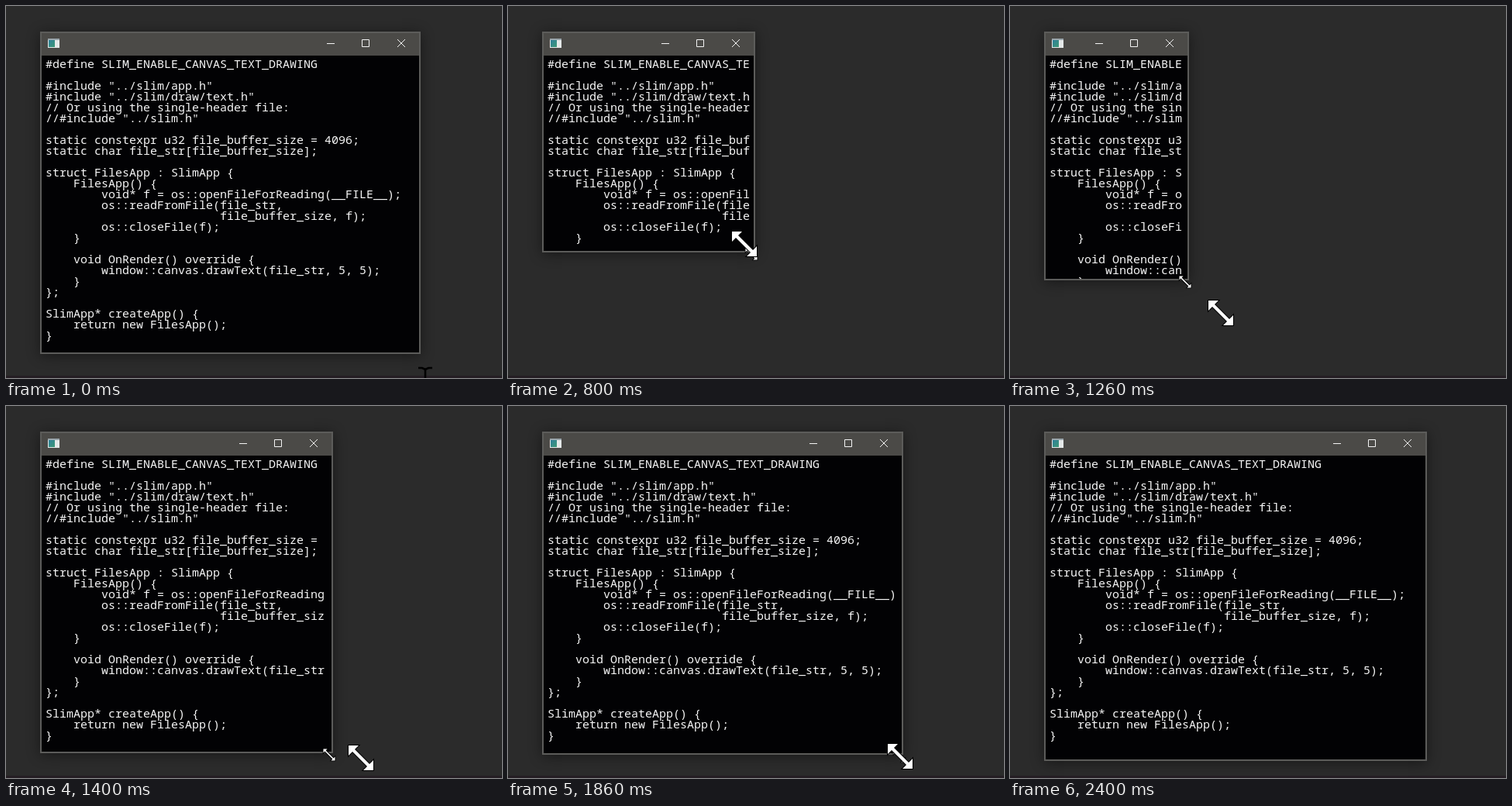
Write an HTML page with a canvas that moves like this. It is 640 px wide and 480 px high and loops after 2.6 s.

```html
<!DOCTYPE html>
<html lang="en">
<head>
<meta charset="utf-8">
<title>Window resize</title>
<style>
  html, body { margin: 0; width: 100%; height: 100%; overflow: hidden; background: #2b2b2b; }
  canvas { display: block; }
</style>
</head>
<body>
<canvas id="stage" width="640" height="480"></canvas>
<script>
const ctx = document.getElementById('stage').getContext('2d');
const LOOP = 2600;
const LEFT = 44, TOP = 33, BAR = 64, MIN_RIGHT = 167;
const CELL = 9, LINE = 14;

const code = `#define SLIM_ENABLE_CANVAS_TEXT_DRAWING

#include "../slim/app.h"
#include "../slim/draw/text.h"
// Or using the single-header file:
//#include "../slim.h"

static constexpr u32 file_buffer_size = 4096;
static char file_str[file_buffer_size];

struct FilesApp : SlimApp {
    FilesApp() {
        void* f = os::openFileForReading(__FILE__);
        os::readFromFile(file_str,
                         file_buffer_size, f);
        os::closeFile(f);
    }

    void OnRender() override {
        window::canvas.drawText(file_str, 5, 5);
    }
};

SlimApp* createApp() {
    return new FilesApp();
}`.split('\n');

// Pointer path during the drag: step, x, y
const drag = [
  [8, 531, 453], [8.5, 522, 470], [9, 490, 487], [10, 417, 472], [11, 338, 366],
  [11.5, 314, 320], [12, 305, 307], [13, 276, 262], [14, 226, 196], [15, 168, 146],
  [16, 140, 160], [16.5, 142, 195], [17, 148, 230], [18, 188, 312], [19, 272, 396],
  [20, 374, 442], [20.5, 417, 450], [21, 458, 454], [22, 530, 448], [23, 580, 432],
  [24, 602, 414], [25, 606, 400], [26, 580, 408], [27, 520, 442], [27.5, 505, 452],
  [28, 506, 452], [30, 528, 464], [31.5, 540, 468], [33.5, 533, 460], [34, 534, 461]
];

function slope(i, axis) {
  const a = drag[Math.max(i - 1, 0)], b = drag[Math.min(i + 1, drag.length - 1)];
  return (b[axis] - a[axis]) / (b[0] - a[0]);
}

// Smooth curve through the drag points
function pointer(s) {
  const last = drag.length - 1;
  s = Math.min(Math.max(s, drag[0][0]), drag[last][0]);
  let i = 0;
  while (i < last - 1 && drag[i + 1][0] <= s) i++;
  const a = drag[i], b = drag[i + 1], span = b[0] - a[0];
  const u = (s - a[0]) / span, v = 1 - u;
  return [1, 2].map(k => Math.round(
    v * v * (1 + 2 * u) * a[k] + u * u * (3 - 2 * u) * b[k] +
    span * u * v * (v * slope(i, k) - u * slope(i + 1, k))));
}

function rect(color, x, y, w, h) {
  ctx.fillStyle = color;
  ctx.fillRect(x, y, w, h);
}

function drawIcon() {
  rect('#e4e8e8', 54, 42, 15, 12);
  rect('#9aa6ac', 54, 42, 15, 2);
  const g = ctx.createLinearGradient(55, 44, 64, 53);
  g.addColorStop(0, '#2f7f9c');
  g.addColorStop(1, '#3f9a72');
  rect(g, 55, 44, 8, 9);
}

function drawButtons(right) {
  ctx.strokeStyle = '#f4f4f4';
  ctx.lineWidth = 1;
  const min = right - 115, max = right - 70, x = right - 24;
  ctx.beginPath();
  ctx.moveTo(min - 5, 48.5);
  ctx.lineTo(min + 5, 48.5);
  ctx.rect(max - 4.5, 43.5, 9, 9);
  ctx.moveTo(x - 5, 43);
  ctx.lineTo(x + 5, 53);
  ctx.moveTo(x + 5, 43);
  ctx.lineTo(x - 5, 53);
  ctx.stroke();
}

function drawWindow(right, bottom) {
  const w = right - LEFT + 1, h = bottom - TOP + 1;
  ctx.save();
  ctx.shadowColor = 'rgba(0,0,0,0.45)';
  ctx.shadowBlur = 16;
  ctx.shadowOffsetY = 2;
  rect('#5c5c5a', LEFT, TOP, w, h);
  ctx.restore();

  ctx.save();
  ctx.beginPath();
  ctx.rect(LEFT + 2, TOP + 2, w - 4, h - 4);
  ctx.clip();
  rect('#4b4a47', LEFT, TOP, w, BAR - TOP);
  rect('#020204', LEFT, BAR, w, h);
  drawButtons(right);
  drawIcon();

  // Only whole characters that fit the width are shown
  const cols = Math.floor((right - 53) / CELL);
  ctx.font = '15px "Noto Sans Mono", "DejaVu Sans Mono", monospace';
  ctx.fillStyle = '#f6f6f6';
  code.forEach((line, i) => ctx.fillText(line.slice(0, cols), LEFT + 7, 80 + i * LINE));
  ctx.restore();
}

function drawResize([x, y], r, leg, half, edge) {
  const n = r - leg / 2, p = n - half, q = n + half;
  const head = [[-r, r - 2 * r + leg], [-r, -r], [-r + leg, -r], [-p, -q]];
  const tail = head.map(([a, b]) => [-a, -b]);
  ctx.beginPath();
  for (const [a, b] of [...head, [q, p], ...tail, [-q, -p]]) ctx.lineTo(x + a, y + b);
  ctx.closePath();
  ctx.lineJoin = 'miter';
  ctx.strokeStyle = '#000';
  ctx.lineWidth = edge;
  ctx.stroke();
  ctx.fillStyle = '#fff';
  ctx.fill();
}

const bigResize = p => drawResize(p, 16, 13, 1.5, 2);
const smallResize = p => drawResize(p, 7.5, 5, 0.6, 1.6);

function drawBeam(x, y) {
  ctx.strokeStyle = '#000';
  ctx.lineWidth = 2.6;
  ctx.beginPath();
  for (const d of [-1, 1]) {
    ctx.moveTo(x - 9, y + 15 * d);
    ctx.lineTo(x - 4, y + 15 * d);
    ctx.lineTo(x, y + 13 * d);
    ctx.lineTo(x + 4, y + 15 * d);
    ctx.lineTo(x + 9, y + 15 * d);
  }
  ctx.moveTo(x, y - 13);
  ctx.lineTo(x, y + 13);
  ctx.stroke();
}

function drawPointer(step) {
  if (step === 0) drawBeam(541, 482);
  else if (step === 1) drawBeam(538, 471);
  else if (step < 4) bigResize([531, 459]);
  else if (step < 6) bigResize([531, 455]);
  else if (step < 36) bigResize(pointer(step));
}

function draw(t) {
  // 15 updates per second on a 10 ms clock
  const step = Math.ceil((Math.floor(t / 10) + 1) * 3 / 20) - 1;
  const dragging = step >= 9 && step <= 34;
  const grip = pointer(step - 0.5);

  rect('#2b2b2b', 0, 0, 640, 480);
  rect('#251e24', 0, 477, 640, 3);
  if (step < 9) drawWindow(534, 448);
  else if (step > 33) drawWindow(537, 457);
  else drawWindow(Math.max(MIN_RIGHT, grip[0] + 4), grip[1] - 3);
  if (dragging) smallResize(grip);
  drawPointer(step);
}

const start = performance.now();
function tick() {
  draw((performance.now() - start) % LOOP);
  requestAnimationFrame(tick);
}
tick();
</script>
</body>
</html>
```
